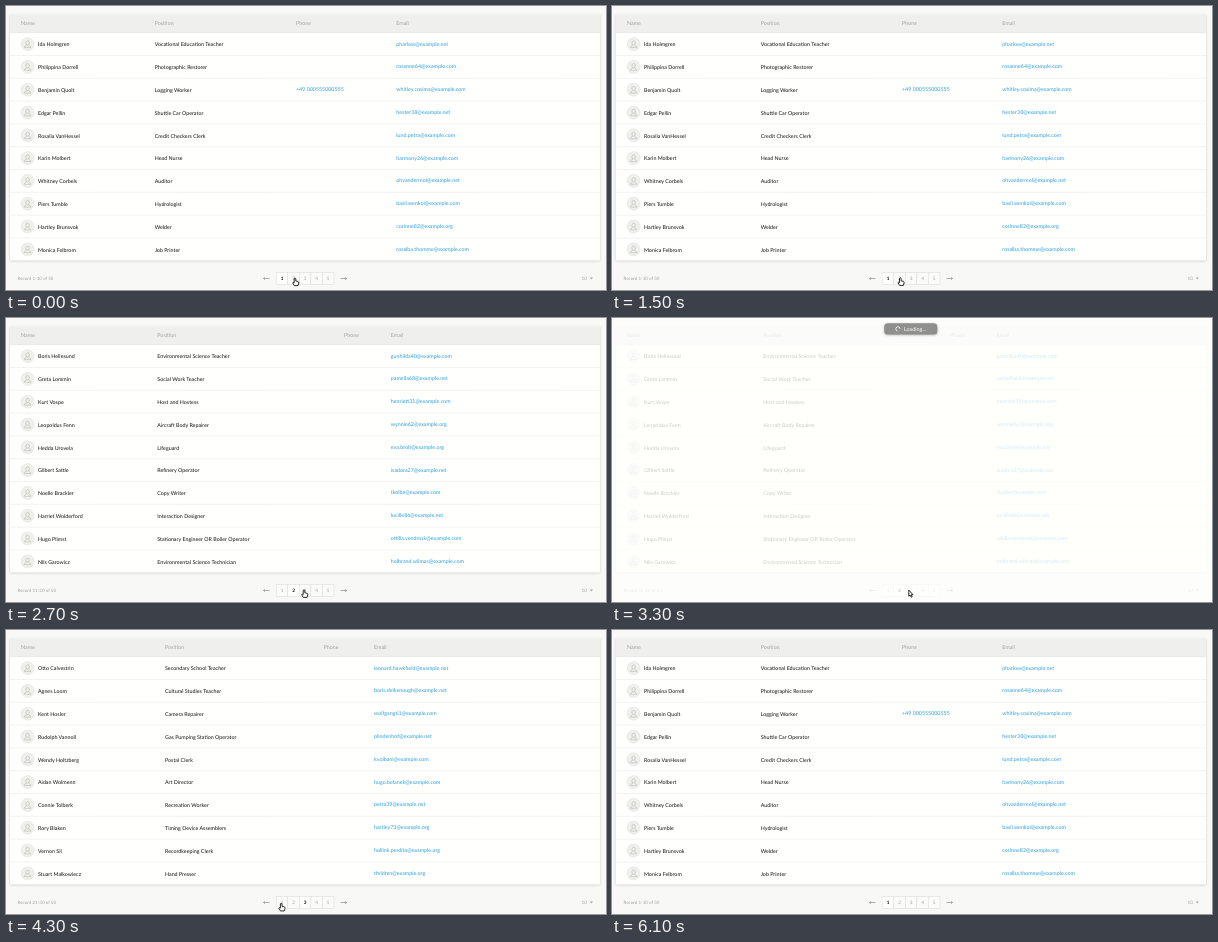
Animation of 600x284 px, one loop 8.1 s. Source, as an HTML page with a canvas:

```html
<!DOCTYPE html>
<html lang="en">
<head>
<meta charset="utf-8">
<title>Paginated table</title>
<style>
html, body { margin: 0; height: 100%; overflow: hidden; background: #f8f8f7; }
canvas { display: block; }
</style>
</head>
<body>
<canvas id="stage" width="600" height="284"></canvas>
<script>
const LOOP = 8100, STEP = 100;
const ctx = document.getElementById('stage').getContext('2d');

// columns: x of Position, Phone, Email; rows: name | position | email | phone
const pages = [
  { columns: [148.7, 290, 390.3], rows: `
Ida Holmgren|Vocational Education Teacher|pharlow@example.net
Philippina Dorrell|Photographic Restorer|rosanne64@example.com
Benjamin Quolt|Logging Worker|whitley.cosima@example.com|+49 000555000555
Edgar Pellin|Shuttle Car Operator|hester38@example.net
Rosalia VanHessel|Credit Checkers Clerk|lund.petra@example.com
Karin Molbert|Head Nurse|harmony26@example.com
Whitney Corbels|Auditor|ohvandermol@example.net
Piers Tumble|Hydrologist|basil.wenkol@example.com
Hartley Brunsvok|Welder|corinne82@example.org
Monica Felbrom|Job Printer|rosalba.thomme@example.com` },
  { columns: [151.3, 338, 384.8], rows: `
Boris Hellesund|Environmental Science Teacher|gunhilda40@example.com
Greta Lommin|Social Work Teacher|pamella68@example.net
Kurt Vospe|Host and Hostess|henriett31@example.com
Leopoldus Fenn|Aircraft Body Repairer|wynnie62@example.org
Hedda Urovela|Lifeguard|eva.brolt@example.org
Gilbert Sattle|Refinery Operator|isadora27@example.net
Noelle Brackler|Copy Writer|tkolbe@example.com
Harriet Wolderford|Interaction Designer|lucille86@example.net
Hugo Plimst|Stationary Engineer OR Boiler Operator|ottilia.vendrosk@example.com
Nils Garowicz|Environmental Science Technician|holbrand.wilmas@example.com` },
  { columns: [159, 317.6, 368], rows: `
Otto Calvestrin|Secondary School Teacher|leonard.hawkfield@example.net
Agnes Loom|Cultural Studies Teacher|boris.delkenough@example.net
Kent Hosler|Camera Repairer|wolfgang61@example.com
Rudolph Vannoll|Gas Pumping Station Operator|plindenhof@example.net
Wendy Holtzberg|Postal Clerk|kvolbani@example.com
Aidan Wolmenn|Art Director|hugo.belanek@example.com
Connie Tolberk|Recreation Worker|petra39@example.net
Rory Blaken|Timing Device Assemblers|hartley73@example.org
Vernon Sil|Recordkeeping Clerk|hollink.perdita@example.org
Stuart Malkowiecz|Hand Presser|tfeldren@example.org` }
].map(({ columns, rows }) => ({
  columns,
  rows: rows.trim().split('\n').map(row => row.split('|'))
}));

// start time and page index
const pageChanges = [[0, 0], [2400, 1], [3600, 2], [5500, 0]];
const loadingSpans = [[2100, 2400], [3300, 3600], [5100, 5500]];

// time, x, y of the pointer tip
const pointerKeys = [
  [0, 289, 272], [200, 289, 272], [500, 272, 279], [700, 256, 273],
  [1000, 290, 272], [1100, 298, 272], [1500, 288.3, 271.8], [2300, 288.3, 271.8],
  [2400, 295, 272], [2500, 295, 272], [2700, 298, 271.8], [3200, 298, 271.8],
  [3300, 296.8, 272.2], [3700, 296.8, 272.2], [4100, 275.5, 273], [4200, 275.5, 273],
  [4300, 275.2, 273.3], [5400, 275.2, 273.3], [5500, 276, 274.5], [5700, 276, 274.5],
  [6000, 541, 190]
];
const handShape = new Path2D('M-.8 .5Q0 -.5 .8 .5V3L3 3.5Q4 3.8 3.8 5L3.1 7.6H-.7L-2.3 5Q-2.2 3.8 -.8 4.8Z');
const arrowShape = new Path2D('M0 0V6L1.4 4.9L2.4 7L3.4 6.5L2.5 4.5H4.2Z');

function text(string, x, baseline, color, size = 5.33, weight = 400, align = 'left') {
  ctx.font = `${weight} ${size}px Lato, sans-serif`;
  ctx.textAlign = align;
  ctx.fillStyle = color;
  ctx.fillText(string, x, baseline);
}

function box(x, y, w, h, color) {
  ctx.fillStyle = color;
  ctx.fillRect(x, y, w, h);
}

function line(color, width, ...points) {
  ctx.strokeStyle = color;
  ctx.lineWidth = width;
  ctx.beginPath();
  points.forEach(([x, y]) => ctx.lineTo(x, y));
  ctx.stroke();
}

function panel(x, y, w, h, radius, color, shadow) {
  ctx.save();
  ctx.shadowColor = shadow;
  ctx.shadowBlur = 2.5;
  ctx.shadowOffsetY = 0.6;
  ctx.fillStyle = color;
  ctx.beginPath();
  ctx.roundRect(x, y, w, h, radius);
  ctx.fill();
  ctx.restore();
}

function avatar(x, y) {
  ctx.fillStyle = '#efefec';
  ctx.strokeStyle = '#e2e2df';
  ctx.lineWidth = 0.6;
  ctx.beginPath();
  ctx.arc(x, y, 6.5, 0, 7);
  ctx.fill();
  ctx.stroke();
  ctx.strokeStyle = '#b9b9b6';
  ctx.beginPath();
  ctx.ellipse(x, y - 1.2, 1.7, 2.1, 0, 0, 7);
  ctx.moveTo(x - 3.4, y + 3.4);
  ctx.quadraticCurveTo(x - 3.2, y + 1.8, x - 1, y + 1.2);
  ctx.moveTo(x + 1, y + 1.2);
  ctx.quadraticCurveTo(x + 3.2, y + 1.8, x + 3.4, y + 3.4);
  ctx.lineTo(x - 3.4, y + 3.4);
  ctx.stroke();
}

function table({ columns: [positionX, phoneX, emailX], rows }) {
  panel(4, 8.5, 590, 246, 1, '#fffffd', 'rgba(0,0,0,.2)');
  box(4, 8.5, 590, 18, '#efefed');
  line('#e2e2df', 0.7, [4, 26.6], [594, 26.6]);
  [['Name', 15], ['Position', positionX], ['Phone', phoneX], ['Email', emailX]]
    .forEach(([label, x]) => text(label, x, 19.3, '#a3a3a1'));
  rows.forEach(([name, position, email, phone = ''], i) => {
    const y = 38.1 + i * 22.8;
    if (i) line('#ecece9', 0.7, [4, y - 11.4], [594, y - 11.4]);
    avatar(21.6, y);
    text(name, 32, y + 2.2, '#111');
    text(position, positionX, y + 2.2, '#111');
    text(phone, phoneX, y + 1.4, '#2d9fdc');
    text(email, emailX, y + 1.4, '#2d9fdc');
  });
}

function longArrow(x, direction) {
  const tip = x + 3 * direction, barb = tip - 1.4 * direction;
  line('#8b8b89', 0.7, [x - 3 * direction, 272.5], [tip, 272.5]);
  line('#8b8b89', 0.7, [barb, 271.2], [tip, 272.5], [barb, 273.8]);
}

function footer(page) {
  text(`Record ${page * 10 + 1}-${page * 10 + 10} of 50`, 11.5, 274.3, '#a3a3a1', 4.5);
  longArrow(260.5, -1);
  longArrow(337.5, 1);
  for (let i = 0; i < 5; i++) {
    const x = 270.2 + i * 11.55, active = i === page;
    box(x, 266.5, 11.55, 12, active ? '#fff' : '#fbfbfa');
    ctx.strokeStyle = '#dfdfdc';
    ctx.lineWidth = 0.6;
    ctx.strokeRect(x, 266.5, 11.55, 12);
    text(i + 1, x + 5.8, 274.3, active ? '#111' : '#a3a3a1', 4.7, active ? 700 : 400, 'center');
  }
  text('10', 575.5, 274.3, '#a3a3a1', 4.7);
  ctx.fillStyle = '#a3a3a1';
  ctx.beginPath();
  [[583.8, 271.6], [586.8, 271.6], [585.3, 273.6]].forEach(([x, y]) => ctx.lineTo(x, y));
  ctx.fill();
}

function loading(time) {
  box(0, 0, 600, 284, 'rgba(255,255,253,.78)');
  panel(272.3, 5.3, 53, 11.2, 3.5, '#8f8f8d', 'rgba(0,0,0,.35)');
  const angle = time / 1000 * Math.PI * 2;
  ctx.strokeStyle = '#fff';
  ctx.lineWidth = 0.8;
  ctx.beginPath();
  ctx.arc(286, 11, 2.2, angle, angle + 4.4);
  ctx.stroke();
  text('Loading...', 292, 13, '#fff');
}

function pointer(time) {
  const next = pointerKeys.findIndex(key => key[0] > time);
  const last = pointerKeys[pointerKeys.length - 1];
  if (time > last[0]) return;
  const to = next < 0 ? last : pointerKeys[next];
  const from = next < 0 ? last : pointerKeys[next - 1];
  const part = to === from ? 0 : (time - from[0]) / (to[0] - from[0]);
  const x = from[1] + (to[1] - from[1]) * part;
  const y = from[2] + (to[2] - from[2]) * part;
  const overButton = x > 270 && x < 328 && y > 266 && y < 278.5;
  const waiting = time >= 3300 && time < 3800;
  const shape = overButton && !waiting ? handShape : arrowShape;
  ctx.save();
  ctx.translate(x, y);
  ctx.fillStyle = '#fff';
  ctx.strokeStyle = '#111';
  ctx.lineWidth = 0.9;
  ctx.fill(shape);
  ctx.stroke(shape);
  ctx.restore();
}

function draw(now) {
  const time = Math.floor(now % LOOP / STEP) * STEP;
  const page = pageChanges.filter(([start]) => start <= time).pop()[1];
  ctx.textRendering = 'geometricPrecision';
  box(0, 0, 600, 284, '#f8f8f7');
  table(pages[page]);
  footer(page);
  if (loadingSpans.some(([start, end]) => time >= start && time < end)) loading(time);
  pointer(time);
  requestAnimationFrame(draw);
}
requestAnimationFrame(draw);
</script>
</body>
</html>
```
